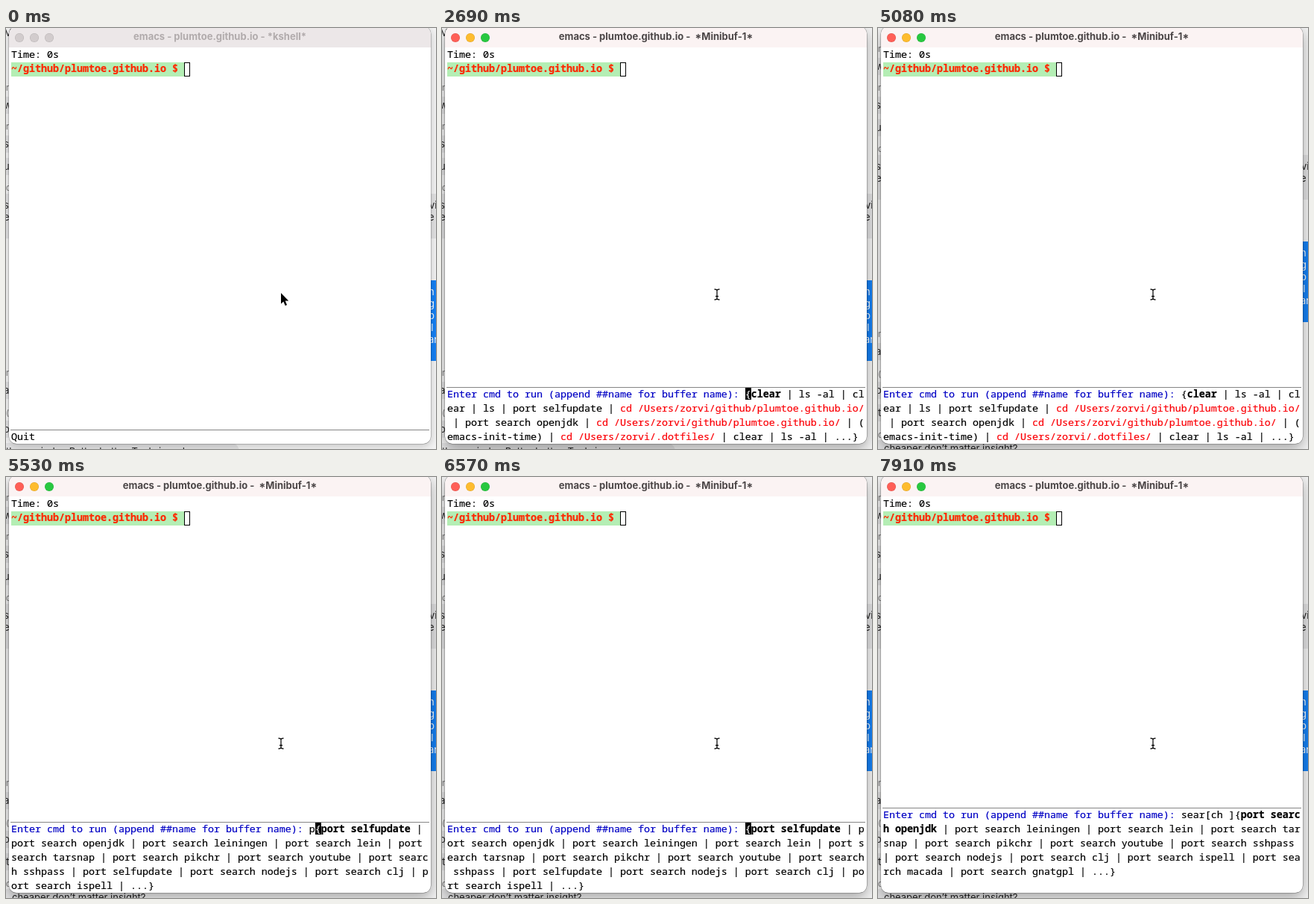
Recreate the animation shown at these times as an HTML page. Size 577x564 px, loop 8000 ms.

```html
<!DOCTYPE html>
<html lang="en">
<head>
<meta charset="utf-8">
<title>Shell buffer</title>
<style>
html, body { margin: 0; width: 100%; height: 100%; overflow: hidden; }
#stage { position: relative; width: 577px; height: 564px; overflow: hidden; background: #f4f4f4; }
#stage div, #stage svg { position: absolute; }
#page { left: 0; top: 0; width: 577px; height: 640px; }
#page div { white-space: pre; font: 13px/16px Inter, sans-serif; color: #222; }
#page .bubble { background: #e3e3e4; }
#page .blue { background: #1480f5; }
#page .small { font-size: 11px; color: #777; }
#page .white { color: #fff; }
#win { left: 4px; top: -2px; width: 566px; height: 559px; border-radius: 10px; background: #fff;
  box-shadow: 0 0 0 .5px rgba(0,0,0,.35), 0 3px 12px rgba(0,0,0,.22); }
#win.focus { box-shadow: 0 0 0 .5px rgba(0,0,0,.4), 0 6px 18px rgba(0,0,0,.34); }
#bar { left: 0; top: 0; width: 566px; height: 28px; border-radius: 10px 10px 0 0; background: #ece7e8; }
.focus #bar { background: #fbf3f3; }
#title { left: 4px; width: 566px; top: 2px; text-align: center; white-space: pre;
  font: 700 13px/18px Inter, sans-serif; color: #b1abac; }
.focus + #title { color: #4b4647; }
.dot { top: 7px; width: 12px; height: 12px; border-radius: 50%; background: #d2cccd;
  box-shadow: inset 0 0 0 .5px rgba(0,0,0,.14); }
.row { left: 7px; height: 19px; white-space: pre; color: #000;
  font: 500 13.333px/16px "Noto Sans Mono", "DejaVu Sans Mono", monospace;
  font-variant-ligatures: none; -webkit-text-stroke: .2px; }
.row span { display: inline-block; height: 16px; white-space: pre; vertical-align: top; }
.ask { color: #0000c4; }
.cd { color: #fb0007; }
.first { font-weight: 800; }
.point { background: #000; color: #fff; }
#prompt { background: #b4eeb4; color: #ff2600; font-weight: 700; width: 232px; }
#caret { left: 239px; top: 46px; width: 8px; height: 19px; box-sizing: border-box; border: 1px solid #000; }
#rule { left: 6px; width: 562px; height: 1px; background: #858585; }
#mini { left: 0; top: 0; }
</style>
</head>
<body>
<div id="stage">
  <div id="page"></div>
  <div id="win"><div id="bar"></div></div>
  <div id="title"></div>
  <div class="dot" style="left:12px"></div>
  <div class="dot" style="left:32px"></div>
  <div class="dot" style="left:52px"></div>
  <div class="row" style="top:27px">Time: 0s</div>
  <div class="row" id="prompt" style="top:46px">~/github/plumtoe.github.io $ </div>
  <div id="caret"></div>
  <div id="rule"></div>
  <div id="mini"></div>
  <svg id="arrow" style="left:367px;top:353px" width="14" height="22" viewBox="-2 -2 14 22">
    <path d="M0 0V14.5L3.3 11.4L5.7 17L8 16L5.7 10.5H10.2Z" stroke="#fff" stroke-width="2" stroke-linejoin="round"/>
    <path d="M0 0V14.5L3.3 11.4L5.7 17L8 16L5.7 10.5H10.2Z"/>
  </svg>
  <svg id="beam" style="left:363px;top:348px" width="12" height="18" viewBox="-6 -9 12 18" fill="none">
    <path id="ib" d="M-3.5-7Q-.5-7 0-5.5Q.5-7 3.5-7M0-5.5V5.5M-3.5 7Q-.5 7 0 5.5Q.5 7 3.5 7M-2 2.5H2" stroke="#fff" stroke-width="2.6"/>
    <use href="#ib"/>
    <path d="M-3.5-7Q-.5-7 0-5.5Q.5-7 3.5-7M0-5.5V5.5M-3.5 7Q-.5 7 0 5.5Q.5 7 3.5 7M-2 2.5H2" stroke="#111" stroke-width="1.3"/>
  </svg>
</div>
<script>
const LOOP = 8000, COLS = 70, ROW = 19, SCROLL_AT = 4180;
const $ = id => document.getElementById(id);
const ASK = 'Enter cmd to run (append ##name for buffer name): ';
const REPO = 'cd /Users/zorvi/github/plumtoe.github.io/';
const search = names => names.split(' ').map(n => 'port search ' + n);

const recent = ['clear', 'ls -al', 'clear', 'ls', 'port selfupdate', REPO, 'port search openjdk', REPO,
  '(emacs-init-time)', 'cd /Users/zorvi/.dotfiles/', 'clear', 'ls -al'];
const ports = ['port selfupdate', ...search('openjdk leiningen lein tarsnap pikchr youtube sshpass'),
  'port selfupdate', ...search('nodejs clj ispell')];
const withS = ['sudo port selfupdate', 'sudo port upgrade outdated', 'sudo port install leiningen',
  'sudo port install openjdk11', 'sudo port uninstall inactive', 'sudo port clean --all installed',
  'port selfupdate', ...search('openjdk leiningen lein tarsnap pikchr')];
const found = search('openjdk leiningen lein tarsnap pikchr youtube sshpass nodejs clj ispell macada gnatgpl');

// start, typed text, completion hint, candidates, minibuffer lines, point shown
const steps = [
  [0, '', '', null, 1, 0],
  [1200, '', '', null, 1, 1],
  [2690, '', '', recent, 4, 1],
  [3140, '', '', recent, 4, 0],
  [3590, '', '', recent, 4, 1],
  [4180, '', '', recent, 4, 0],
  [4630, '', '', recent, 4, 1],
  [5080, '', '', recent, 4, 0],
  [5530, 'p', '', ports, 5, 1],
  [5820, 'por', '', ports, 5, 1],
  [6120, 'port', '', ports, 5, 1],
  [6570, '', '', ports, 5, 1],
  [6870, 's', '', withS, 6, 1],
  [7170, 'sea', '[rch ]', found, 6, 1],
  [7320, 'sear', '[ch ]', found, 6, 1],
  [7910, 'sear', '[ch ]', found, 6, 0]
];

function add(parent, cls, style, text = '') {
  const el = document.createElement('div');
  el.className = cls;
  el.textContent = text;
  Object.assign(el.style, style);
  parent.append(el);
}

function buildPage() {
  const box = (cls, x, y, w, h, r = 0) => add($('page'), cls,
    { left: x + 'px', top: y + 'px', width: w + 'px', height: h + 'px', borderRadius: `0 ${r}px ${r}px 0` });
  const say = (text, x, y, cls = '') => add($('page'), cls, { left: x + 'px', top: y - 8 + 'px' }, text);
  for (const y of [92, 144, 174, 474, 526]) box('bubble', 0, y, 200, 23);
  box('bubble', 0, 222, 577, 60);
  box('bubble', 0, 556, 313, 23, 11);
  box('bubble', 0, 604, 183, 23, 11);
  box('blue', 300, 338, 277, 108);
  for (const [c, y] of [['r', 80], ['r', 132], ['d', 214], ['r', 462], ['(', 515], ['d', 597]])
    say(c, 0, y, 'small');
  for (const [c, y] of [['M', 6], ['w', 103], ['s', 155], ['u', 185], ['s', 237], ['e', 253], ['!', 269], ['a', 485], ['o', 537]])
    say(c, -3, y);
  say('the reminder. Better button Tools in order', 0, 567);
  say('cheaper don’t matter insight?', 8, 615);
  say('vi', 568, 237);
  say('e -', 567, 253);
  ['n', 'g', 'p', 'il', 'ar'].forEach((c, i) => say(c, 567, 353 + 16 * i, 'white'));
}

function cells(typed, hint, list, on) {
  const out = [];
  const put = (text, cls = '') => { for (const c of text) out.push([c, cls]); };
  put(ASK, 'ask');
  put(typed + hint + '{');
  list.forEach((item, i) => {
    put(item, i === 0 ? 'first' : item.startsWith('cd ') ? 'cd' : '');
    put(' | ');
  });
  put('...}');
  if (on) out[ASK.length + typed.length][1] = 'point';
  return out;
}

function drawMini(all, top) {
  $('mini').textContent = '';
  for (let i = 0; i < all.length; i += COLS) {
    const row = document.createElement('div');
    row.className = 'row';
    row.style.top = top + i / COLS * ROW + 'px';
    let run = null;
    for (const [c, cls] of all.slice(i, i + COLS)) {
      if (!run || run.className !== cls) {
        run = document.createElement('span');
        run.className = cls;
        row.append(run);
      }
      run.textContent += c;
    }
    $('mini').append(row);
  }
}

function show([at, typed, hint, list, lines, on]) {
  const focus = at >= 1200, top = 558 - lines * ROW;
  $('win').className = focus ? 'focus' : '';
  $('title').textContent = 'emacs - plumtoe.github.io - ' + (list ? ' *Minibuf-1*' : '*kshell*');
  const lights = focus ? ['#ff5f57', '#febc2e', '#28c840'] : ['', '', ''];
  document.querySelectorAll('.dot').forEach((d, i) => d.style.backgroundColor = lights[i]);
  $('caret').style.background = on && !list ? '#000' : '#fff';
  $('arrow').style.display = focus ? 'none' : '';
  $('beam').style.display = focus ? '' : 'none';
  $('rule').style.top = top - 1 + 'px';
  $('page').style.transform = at >= SCROLL_AT ? 'translateY(-52px)' : '';
  drawMini(list ? cells(typed, hint, list, on) : [...'Quit'].map(c => [c, '']), top);
}

let current = null;
function tick() {
  const t = performance.now() % LOOP;
  const step = steps.findLast(s => s[0] <= t);
  if (step !== current) show(current = step);
  requestAnimationFrame(tick);
}

buildPage();
tick();
</script>
</body>
</html>
```
